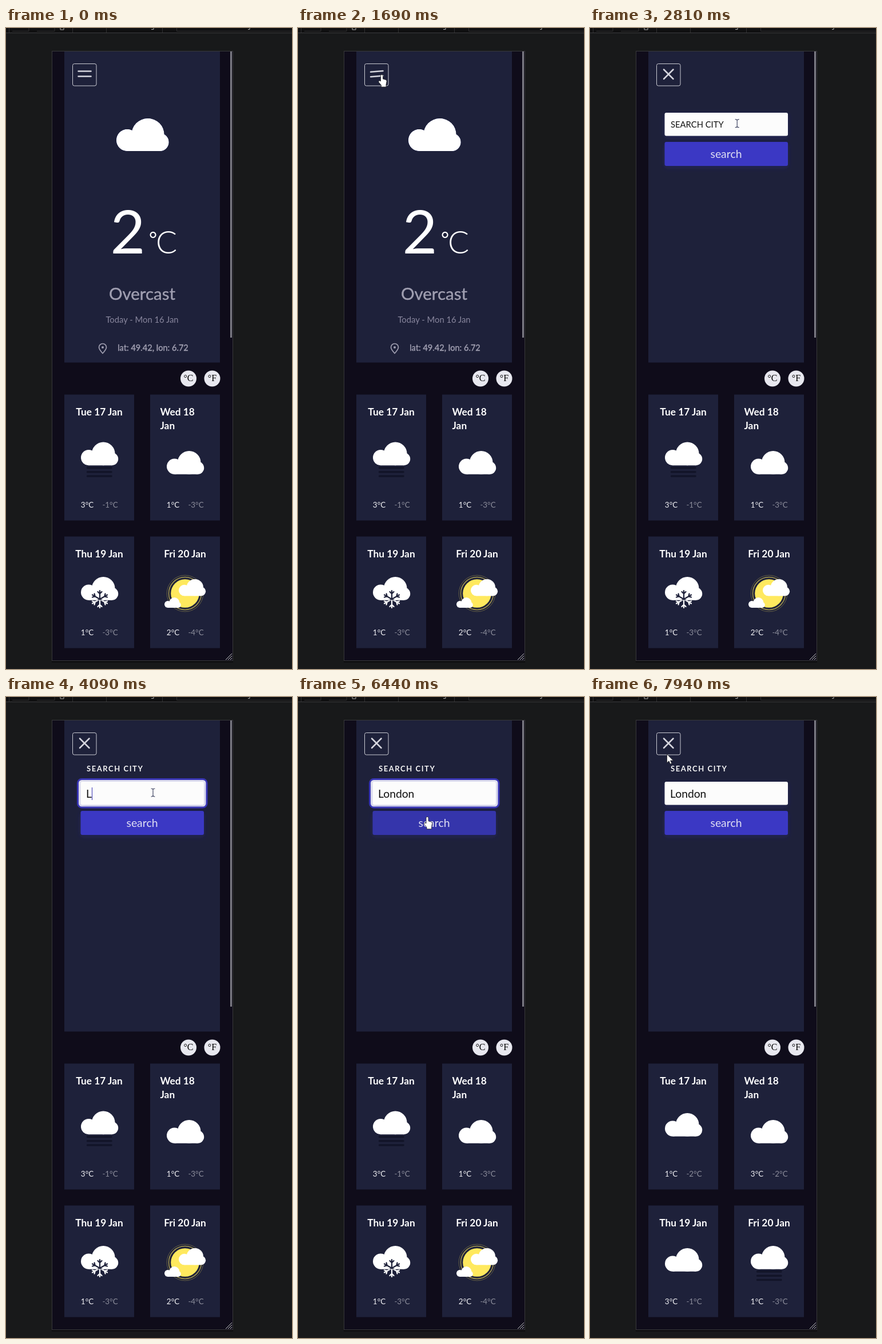
Write an HTML page that moves like this. It is 500 px wide and 1120 px high and loops after 7.99 s.

```html
<!DOCTYPE html>
<html lang="en">
<head>
<meta charset="utf-8">
<title>Weather search</title>
<style>
  html, body { margin: 0; width: 100%; height: 100%; overflow: hidden; background: #18191a; }
  svg { display: block; width: 500px; height: 1120px; font-family: Lato, "Open Sans", sans-serif; }
  .mid { text-anchor: middle; }
  .day { font-size: 17.3px; font-weight: 700; fill: #fff; }
  .temp { font-size: 13.4px; fill: #f2f2f5; }
  .dim { fill: #8d8e9c; }
  .medium { fill: #a09fb1; stroke: #a09fb1; stroke-width: .4px; }
  .unit { font: 16px "Liberation Serif", serif; }
  .line { fill: none; stroke-linecap: round; stroke-linejoin: round; }
  #sky { mix-blend-mode: plus-lighter; }
</style>
</head>
<body>
<svg viewBox="0 0 500 1120">
  <defs>
    <g id="cloud" fill="#fff">
      <circle cx="19" cy="38" r="19"/><circle cx="55" cy="28.500" r="28.500"/>
      <circle cx="76" cy="41.500" r="15.500"/><path d="M19 35H76V57H19z"/>
    </g>
    <g id="flake" class="line">
      <g id="axis"><path d="M0-15V15M-3.500-13 0-9.500 3.500-13M-3.500 13 0 9.500 3.500 13"/></g>
      <use href="#axis" transform="rotate(60)"/><use href="#axis" transform="rotate(120)"/>
    </g>
    <clipPath id="belowCloud"><path d="M-20 1.500H20V20H-20z"/></clipPath>
    <filter id="glow" x="-20%" y="-50%" width="140%" height="220%">
      <feDropShadow dx="0" dy="3" stdDeviation="5" flood-color="#3a38c4" flood-opacity=".22"/>
    </filter>
  </defs>

  <!-- browser toolbar edge -->
  <path d="M0 0H500V8H0z" fill="#101011"/>
  <path d="M0 8.500H500" stroke="#3c3c3e"/>
  <path d="M5.500 0V8M116.500 0V8M175.500 0V8M273.500 0V8M11 5.500H40V0M54 5.500H85V0M298.500 0V5.500H500" fill="none" stroke="#303032"/>
  <path d="M95 0V3H101V0M254 2.500H258V0M423 2.500H426V0" fill="none" stroke="#aaa"/>

  <!-- device -->
  <path d="M80 1107H397" stroke="#0d0d0f" stroke-width="3"/>
  <rect x="80.500" y="40.500" width="316" height="1065" fill="#0f0c1a" stroke="#38383b"/>
  <path d="M102 41H374V584.500H102z" fill="#1e213a"/>
  <path id="scrollbar" d="M393.500 41V541" stroke="#7d7d86" stroke-width="3"/>
  <path d="M384 1104 395 1093M388 1104 395 1097M392 1104 395 1101" stroke="#c9c9cc"/>

  <g id="weather">
    <text class="mid" x="213" y="394" font-size="105" fill="#fff">2</text>
    <text x="250" y="381" font-size="34" fill="#fff">°</text>
    <text x="262" y="394" font-size="55" font-weight="300" fill="#fff">C</text>
    <text class="mid medium" x="238" y="475" font-size="29.500">Overcast</text>
    <text class="mid" x="238" y="515" font-size="14.800" fill="#88869d">Today - Mon 16 Jan</text>
    <path class="line" d="M169 568.500C165 564 162.500 561 162.500 558a6.500 6.500 0 0 1 13 0C175.500 561 173 564 169 568.500z" stroke="#a09fb1" stroke-width="1.700"/>
    <circle cx="169" cy="558" r="2" fill="#a09fb1"/>
    <text class="mid medium" x="257" y="564" font-size="14.600">lat: 49.42, lon: 6.72</text>
  </g>

  <g id="form">
    <rect id="ring" x="125.500" y="143.500" width="225.500" height="49.500" rx="7" fill="#e6e6f0" stroke="#3936b4" stroke-width="3"/>
    <rect x="130.500" y="148" width="215.500" height="40.500" rx="3" fill="#fcfcfc" filter="url(#glow)"/>
    <rect id="submit" x="130.500" y="199" width="215.500" height="42" rx="3" filter="url(#glow)"/>
    <text class="mid" x="238" y="227" font-size="19.400" fill="#dfdff3">search</text>
    <text id="label" x="141">SEARCH CITY</text>
    <text id="query" x="140" y="175.500" font-size="19.300" fill="#111"></text>
    <path id="caret" d="M0 158V180" stroke="#3936b4"/>
  </g>
  <g id="sky"><use href="#cloud" x="193" y="158"/></g>

  <rect x="116.500" y="62.500" width="41.500" height="38.500" rx="3" fill="none" stroke="#c9cad2"/>
  <g class="line" stroke="#d6d6de" stroke-width="2.500">
    <path id="barA"/><path id="barB"/>
  </g>

  <circle cx="319" cy="612.500" r="14" fill="#e8e8ef"/>
  <circle cx="360.500" cy="612.500" r="14" fill="#e8e8ef"/>
  <text class="unit mid" x="319" y="617">°C</text>
  <text class="unit mid" x="360.500" y="617">°F</text>

  <path d="M102 640.500H224V860.500H102zM252 640.500H374V860.500H252zM102 888.500H224V1083.500H102zM252 888.500H374V1083.500H252z" fill="#1e213a"/>
  <g class="day">
    <text class="mid" x="163" y="677">Tue 17 Jan</text>
    <text x="269.500" y="677">Wed 18</text><text x="269.500" y="701">Jan</text>
    <text class="mid" x="163" y="925">Thu 19 Jan</text>
    <text class="mid" x="313" y="925">Fri 20 Jan</text>
  </g>
  <g id="before"></g>
  <g id="after"></g>

  <g id="cursor">
    <path id="arrow" d="M0 0V15L3.500 11.800 5.700 17 8.300 15.900 6.100 11H11z" fill="#fff" stroke="#222" stroke-width=".8"/>
    <path id="hand" d="M-2 11V1.500a2 2 0 0 1 4 0V7L7 8.500Q9 9.300 8.600 11.500L7.500 17V21H-1V18L-5.500 12.500Q-6 10-4 10z" fill="#fff" stroke="#222" stroke-width=".8"/>
    <path id="beam" class="line" d="M-3-7Q0-7 0-5V5Q0 7-3 7M3-7Q0-7 0-5M0 5Q0 7 3 7" stroke="#444a66" stroke-width="1.200"/>
  </g>
</svg>
<script>
const LOOP = 7990;
const $ = id => document.getElementById(id);
const set = (id, attrs) => {
  for (const name in attrs) $(id).setAttribute(name, attrs[name]);
};
const show = (id, visible) => set(id, { visibility: visible ? 'visible' : 'hidden' });
const mix = (a, b, p) => a + (b - a) * p;
const smooth = (t, start, end) => {
  const p = Math.min(1, Math.max(0, (t - start) / (end - start)));
  return p * p * (3 - 2 * p);
};

// Each key is [time, ...values].
function track(t, keys) {
  let i = 0;
  while (i < keys.length - 2 && t >= keys[i + 1][0]) i++;
  const [a, b] = [keys[i], keys[i + 1]];
  const p = smooth(t, a[0], b[0]);
  return a.slice(1).map((v, k) => mix(v, b[k + 1], p));
}

const cloud = (x, y, scale = .713) =>
  `<use href="#cloud" transform="translate(${x} ${y}) scale(${scale})"/>`;
const fog = (x, y) => cloud(x, y) +
  `<path class="line" transform="translate(${x} ${y})" d="M11.500 45H53M11.500 52.300H53M11.500 59.500H53" stroke="#121428" stroke-width="3.500"/>`;
const snow = (x, y) => cloud(x, y) +
  `<g transform="translate(${x + 33} ${y + 39})" stroke-width="2.200"><use href="#flake" stroke="#1e213a"/>
   <g clip-path="url(#belowCloud)"><use href="#flake" stroke="#fff"/></g></g>`;
const sun = (x, y) =>
  `<g fill="none" stroke="#ffe95e"><circle cx="${x}" cy="${y}" r="28.500" stroke-opacity=".6" stroke-width="1.500"/>
   <circle cx="${x}" cy="${y}" r="31.800" stroke-opacity=".3"/></g>
   <circle cx="${x}" cy="${y}" r="24.800" fill="#ffe95e"/>` +
  cloud(x - 11, y - 25, .515) + cloud(x - 36, y + 7, .315);
const temps = (x, y, high, low) =>
  `<text class="temp mid" x="${x - 21}" y="${y}">${high}°C</text>
   <text class="temp dim mid" x="${x + 19}" y="${y}">${low}°C</text>`;

$('before').innerHTML = fog(131, 723.5) + cloud(281, 739) + snow(131, 959) + sun(313, 988) +
  temps(163, 838, 3, -1) + temps(313, 838, 1, -3) + temps(163, 1061, 1, -3) + temps(313, 1061, 2, -4);
$('after').innerHTML = cloud(131, 727) + cloud(281, 739) + cloud(131, 963) + fog(281, 959) +
  temps(163, 838, 1, -2) + temps(313, 838, 3, -2) + temps(163, 1061, 3, -1) + temps(313, 1061, 1, -3);

const pointer = [
  [100, 453, 1104], [880, 152, 126], [950, 151, 121], [1230, 146.5, 82], [1690, 146.5, 82],
  [1970, 241, 131], [2390, 268, 152], [2850, 257, 167], [5890, 257, 167],
  [6630, 220, 218], [6700, 256, 229.5], [7510, 256, 229.5], [7940, 134.5, 100]
];
const barA = [
  [1620, 126.5, 75.5, 148.5, 75.5], [1690, 127, 76.8, 148.5, 75],
  [1970, 127.5, 76.3, 129, 75.8], [2440, 129, 72.5, 145.5, 89]
];
const barB = [
  [1620, 126.5, 84.5, 148.5, 84.5], [1690, 127, 85.2, 148.5, 83.4],
  [1970, 145, 74.6, 146.5, 74], [2440, 145.5, 72.5, 129, 89]
];
const keystrokes = [4090, 4550, 4820, 5090, 5160, 5290];
const caretOn = [[2950, 3750], [4090, 4290], [4550, 4750], [4820, 5020], [5090, 5220], [5290, 5360]];

const line = ([x1, y1, x2, y2]) => `M${x1} ${y1}L${x2} ${y2}`;

function drawCursor(t, formOpen) {
  const [x, y] = track(t, pointer);
  const inForm = formOpen && x > 130 && x < 346;
  const onSubmit = inForm && y > 199 && y < 241;
  const onMenu = x > 117 && x < 158 && y > 62 && y < 99;
  const shape = onMenu || onSubmit ? 'hand' : inForm && y > 148 && y < 188 ? 'beam' : 'arrow';
  for (const id of ['arrow', 'hand', 'beam']) {
    set(id, { display: t >= 100 && id === shape ? 'inline' : 'none' });
  }
  set('cursor', { transform: `translate(${x} ${y})` });
  set('submit', { fill: onSubmit ? '#3535ab' : '#3a38c4' });
}

function draw(t) {
  const open = smooth(t, 1690, 2080);
  set('form', { opacity: open });
  set('weather', { opacity: 1 - open });
  set('sky', { opacity: 1 - open });
  set('barA', { d: line(track(t, barA)) });
  set('barB', { d: line(track(t, barB)) });

  const lift = smooth(t, 2950, 3200);
  const grey = Math.round(mix(20, 245, lift));
  set('ring', { opacity: lift * (1 - smooth(t, 6900, 7220)) });
  set('label', {
    y: mix(174, 130, lift),
    'font-size': mix(14.8, 13, lift),
    'letter-spacing': mix(0, 1.55, lift),
    'font-weight': lift > .5 ? 700 : 400,
    fill: `rgb(${grey},${grey},${grey})`
  });

  $('query').textContent = 'London'.slice(0, keystrokes.filter(k => t >= k).length);
  const caretX = Math.round(140 + $('query').getComputedTextLength()) + .5;
  set('caret', { transform: `translate(${caretX} 0)` });
  show('caret', caretOn.some(([from, to]) => t >= from && t < to));

  show('scrollbar', t < 5360 || t >= 5890);
  show('before', t < 7510);
  show('after', t >= 7510);
  drawCursor(t, open > .5);
}

function tick() {
  draw(performance.now() % LOOP);
  requestAnimationFrame(tick);
}
tick();
</script>
</body>
</html>
```
